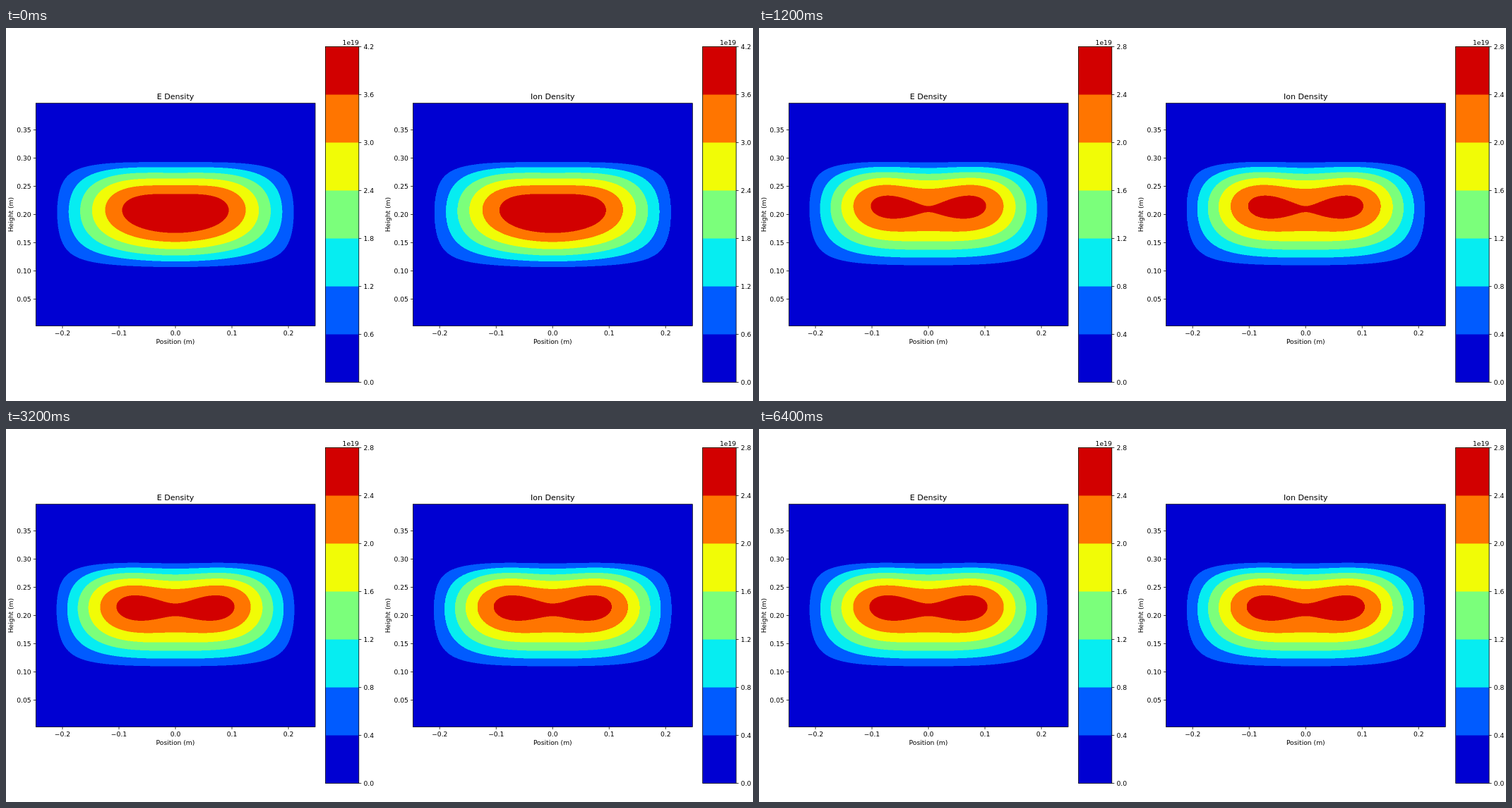
Write an HTML page with a canvas that moves like this. It is 1058 px wide and 529 px high and loops after 8.6 s.

```html
<!DOCTYPE html>
<html lang="en">
<head>
<meta charset="utf-8">
<title>Density contours</title>
<style>
html, body { margin: 0; width: 100%; height: 100%; overflow: hidden; background: #fff; }
canvas { display: block; width: 1058px; height: 529px; }
</style>
</head>
<body>
<canvas width="1058" height="529"></canvas>
<script>
const ctx = document.querySelector('canvas').getContext('2d');

const LOOP = 8600, STEP = 400, LAST = 16;
const CENTER = 240;
const axes = { x: 42.3, y: 106.7, w: 395.7, h: 315.8 };
const bar = { x: 452.4, y: 26.5, w: 47.4, h: 476 };

// The plasma fills a box inside the axes; its density is a sum of box modes.
const box = { half: 184, bottom: 347, height: 164 };

// Field bitmap: two samples per pixel, placed on whole pixels.
const field = { x: 42, y: 106, w: 397, h: 317, scale: 2 };
const bitmap = document.createElement('canvas');
bitmap.width = field.w * field.scale;
bitmap.height = field.h * field.scale;
const bitmapCtx = bitmap.getContext('2d');

const ramp = (v, a, b) => Math.min(1, Math.max(0, (v - a) / (b - a)));

function jet(v) {
  const r = ramp(v, 0.35, 0.66) - ramp(v, 0.89, 1) / 2;
  const g = ramp(v, 0.125, 0.375) - ramp(v, 0.64, 0.91);
  const b = 0.5 + ramp(v, 0, 0.11) / 2 - ramp(v, 0.34, 0.65);
  return [r, g, b].map(c => Math.round(c * 255));
}

// Relaxation from start to rest; a swinging mode overshoots every two steps.
const decay = (start, rest, rate, k) => rest + (start - rest) * rate ** k;
function swing(start, rest, rate, k) {
  const a = k * Math.PI / 2;
  return rest + (start - rest) * rate ** k * (Math.cos(a) + 0.867 * Math.sin(a));
}

// Profile across the box: even cosine modes 1, 3 and 5.
function profile(x, modes) {
  const a = Math.PI * x / (2 * box.half);
  return Math.abs(x) < box.half
    ? modes.reduce((sum, c, i) => sum + c * Math.cos((2 * i + 1) * a), 0) : 0;
}

function densityRows(k) {
  const main = [
    swing(4.335, 2.76, 0.252, k), swing(-0.094, -0.247, 0.45, k), decay(-0.071, -0.11, 0.6, k)
  ];
  const skew = [decay(-0.205, -0.32, 0.5, k), 0.06, 0.05];
  const xs = Array.from({ length: bitmap.width }, (_, i) => field.x + (i + 0.5) / field.scale - CENTER);
  const mainX = xs.map(x => profile(x, main));
  const skewX = xs.map(x => profile(x, skew));
  return Array.from({ length: bitmap.height }, (_, j) => {
    const rise = (box.bottom - field.y - (j + 0.5) / field.scale) / box.height;
    const a = Math.PI * ramp(rise, 0, 1);
    const s1 = Math.sin(a), s2 = Math.sin(2 * a);
    return mainX.map((m, i) => m * s1 + skewX[i] * s2);
  });
}

function buildField(k) {
  const rows = densityRows(k);
  const peak = Math.max(...rows.map(row => Math.max(...row)));
  const step = peak > 3.2 ? 0.6 : 0.4;
  const bands = Math.ceil(peak / step);
  const colors = Array.from({ length: bands }, (_, i) => jet((i + 0.5) / bands));

  const image = bitmapCtx.createImageData(bitmap.width, bitmap.height);
  let p = 0;
  for (const row of rows) {
    for (const value of row) {
      const [r, g, b] = colors[Math.max(0, Math.floor(value / step))];
      image.data[p++] = r;
      image.data[p++] = g;
      image.data[p++] = b;
      image.data[p++] = 255;
    }
  }
  bitmapCtx.putImageData(image, 0, 0);
  return { step, bands, colors };
}

function text(str, x, y, align = 'center', size = 9.2) {
  ctx.font = `${size}px "DejaVu Sans", sans-serif`;
  ctx.textAlign = align;
  ctx.fillStyle = '#000';
  ctx.fillText(str, x, y);
}

function line(x1, y1, x2, y2) {
  ctx.beginPath();
  ctx.moveTo(x1, y1);
  ctx.lineTo(x2, y2);
  ctx.stroke();
}

function drawAxes(title) {
  const { x, y, w, h } = axes;
  ctx.save();
  ctx.beginPath();
  ctx.rect(x, y, w, h);
  ctx.clip();
  ctx.drawImage(bitmap, field.x, field.y, field.w, field.h);
  ctx.restore();
  ctx.strokeRect(x, y, w, h);

  for (let i = -2; i <= 2; i++) {
    const tx = CENTER + i * 80;
    line(tx, y + h, tx, y + h + 3.5);
    text((i < 0 ? '\u2212' : '') + Math.abs(i / 10).toFixed(1), tx, 436);
  }
  for (let i = 1; i <= 7; i++) {
    const ty = 424.5 - i * 40;
    line(x - 3.5, ty, x, ty);
    text((i * 0.05).toFixed(2), x - 6.7, ty + 3.5, 'right');
  }
  text(title, CENTER, 101, 'center', 11.05);
  text('Position (m)', CENTER, 448.3);
  ctx.save();
  ctx.translate(9.5, 264.6);
  ctx.rotate(-Math.PI / 2);
  text('Height (m)', 0, 0);
  ctx.restore();
}

function drawBar({ step, bands, colors }) {
  const { x, y, w, h } = bar;
  const right = x + w;
  const level = i => y + h * (1 - i / bands);
  colors.forEach((color, i) => {
    ctx.fillStyle = `rgb(${color})`;
    ctx.fillRect(x, y, w, level(i) - y);
    if (i === 0) return;
  });
  for (let i = 0; i <= bands; i++) {
    line(right, level(i), right + 3.5, level(i));
    text((i * step).toFixed(1), right + 6.7, level(i) + 3.5, 'left');
  }
  ctx.strokeRect(x, y, w, h);
  text('1e19', right, 23.5, 'right');
}

function draw(k) {
  const scale = buildField(k);
  ctx.setTransform(1, 0, 0, 1, 0, 0);
  ctx.fillStyle = '#fff';
  ctx.fillRect(0, 0, 1058, 529);
  ctx.strokeStyle = '#000';
  ctx.lineWidth = 0.75;
  for (const title of ['E Density', 'Ion Density']) {
    drawAxes(title);
    drawBar(scale);
    ctx.translate(534.3, 0);
  }
}

const start = performance.now();
let shown = -1;
function tick() {
  const k = Math.min(LAST, Math.floor((performance.now() - start) % LOOP / STEP));
  if (k !== shown) draw(shown = k);
  requestAnimationFrame(tick);
}
tick();
</script>
</body>
</html>
```
